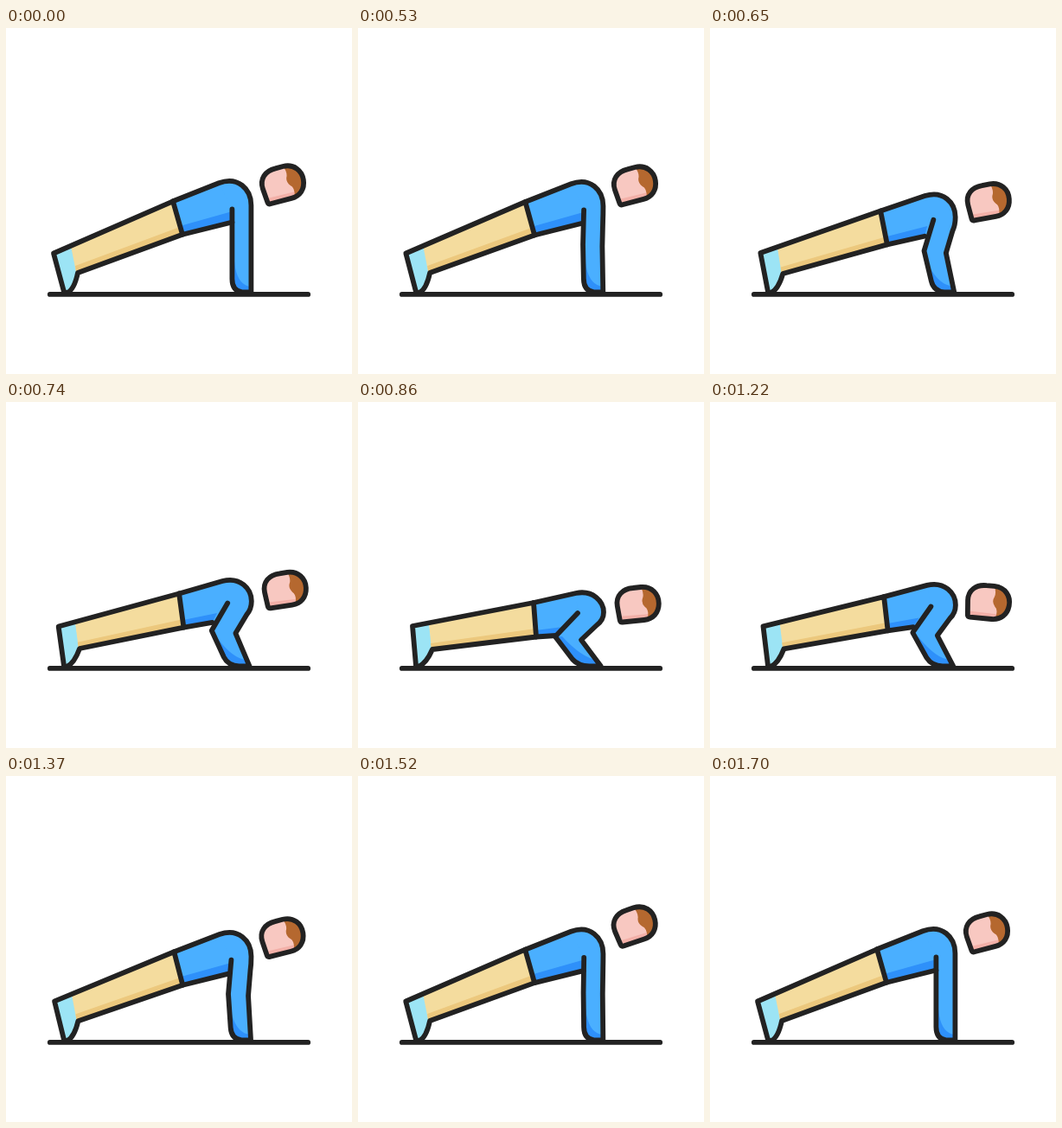
Recreate the animation shown at these times as an HTML page with a canvas. Size 400 by 400 pixels, loop 1.76 s.

```html
<!DOCTYPE html>
<html lang="en">
<head>
<meta charset="utf-8">
<title>Push-up</title>
<style>
html, body { margin: 0; width: 100%; height: 100%; overflow: hidden; background: #fff; }
canvas { display: block; }
</style>
</head>
<body>
<canvas id="stage" width="400" height="400"></canvas>
<script>
const ctx = document.getElementById('stage').getContext('2d');
const LOOP = 1760, STEP = 30, START = 530, END = 1700;

// Rows of [time, value...]; returns smooth values without overshoot.
function track(rows, t) {
  const last = rows.length - 1;
  if (t <= rows[0][0]) return rows[0].slice(1);
  if (t >= rows[last][0]) return rows[last].slice(1);
  const i = rows.findIndex(r => r[0] > t) - 1;
  const span = rows[i + 1][0] - rows[i][0], u = (t - rows[i][0]) / span;
  return rows[i].slice(1).map((_, c) => {
    const rate = n => (rows[n + 1][c + 1] - rows[n][c + 1]) / (rows[n + 1][0] - rows[n][0]);
    const slope = n => {
      if (n === 0 || n === last) return 0;
      const a = rate(n - 1), b = rate(n);
      return a * b <= 0 ? 0 : 2 * a * b / (a + b);
    };
    const from = rows[i][c + 1], to = rows[i + 1][c + 1];
    return from + (to - from) * u * u * (3 - 2 * u)
      + span * u * (1 - u) * ((1 - u) * slope(i) - u * slope(i + 1));
  });
}

// time, drop of the shoulders
const drop = [[500, 0], [530, 1], [650, 15.5], [860, 43.5], [1040, 50],
  [1220, 34], [1370, 4], [1480, .8], [1700, 0]];

// time, x, y, tilt in degrees
const headMove = [[500, 320.3, 180.2, -9], [530, 320.3, 181.2, -9], [650, 322, 200.5, -4.5],
  [860, 323.8, 234, 0], [1040, 324.3, 241, 5], [1220, 322, 232, 11], [1370, 319.8, 186, -8.5],
  [1490, 320, 172, -13], [1600, 320.2, 176, -11], [1700, 320.3, 180.2, -9]];

const INK = '#222', BLUE = '#4aafff', DEEP = '#2e90fa';

// Each part: fill colour (or null for an outline), raised pose, lowered pose
const body = [
  ['#9ce4f5', 'M55 260.5 L76 252 L82 283 Q79 302 71 306 L67 305Z',
              'M63 259 L82 256 L86 286 Q79 302 70 306 L67 305Z'],
  ['#f4dc9e', 'M75 252 L193 200.3 L204 238.7 L81 282Z', 'M82 256 L203 232 L206 271.5 L85 286Z'],
  ['#ecc87d', 'M80 275 L201 230 L204 238.7 L81 282Z', 'M84 279 L205 262 L206 271.5 L85 286Z'],
  [BLUE, 'M193 200.3 L204 238.7 L261.4 224.5 L275 205 L246 179.2Z',
         'M203 232 L206 271.5 L229 270 L275 245 L252 221Z'],
  [DEEP, 'M201 229 L261.4 212 L261.4 224.5 L204 238.7Z', 'M205 264 L237 260 L229 270 L206 271.5Z'],
  [BLUE, 'M261.4 209.5 L261.4 250 L261.4 290 Q261.4 304 273 305.3 L283.4 305.3 L283.4 252 L283.4 222 Q283.4 215 283.4 205 C283.4 186 268 171 246 179.2Z',
         'M254 244 L228 271.3 L248 297.5 Q255 305.5 268 305.3 L280.7 305.3 L258 275 L276 258 Q284 252 284 243 C284 231 272 217 252 221Z'],
  [DEEP, 'M261.4 250 L261.4 290 Q261.4 304 273 305.3 L283.4 305.3 L283.4 299 Q269 298 265 277Z',
         'M228 271.3 L248 297.5 Q255 305.5 268 305.3 L280.7 305.3 L276 298 Q259 296 236 271Z'],
  [null, 'M193 200.3 L55 260.5 L67 305 L71 306 Q79 302 83 283 L204 238.7 L193 200.3',
         'M203 232 L63 259 L67 305 L70 306 Q79 302 86 286 L206 271.5 L203 232'],
  [null, 'M204 238.7 L261.4 224.5', 'M206 271.5 L229 270'],
  [null, 'M261.4 209.5 L261.4 250 L261.4 290 Q261.4 304 273 305.3 L283.4 305.3 L283.4 252 L283.4 222 Q283.4 215 283.4 205 C283.4 186 268 171 246 179.2 L193 200.3',
         'M254 244 L228 271.3 L248 297.5 Q255 305.5 268 305.3 L280.7 305.3 L258 275 L276 258 Q284 252 284 243 C284 231 272 217 252 221 L203 232']
];

const skull = new Path2D('M-18 20.5 Q-20.5 21 -21 18.5 L-24 2 C-26 -10 -18 -18 -6 -19 L3 -20 C16 -21 24 -12 24 -1 C24 10 17 17 7 18Z');
const jaw = new Path2D('M-24 14 L14 11 L14 24 L-24 24Z');
const hair = new Path2D('M2 -22 Q7 -14 5.5 -8 Q3 -2 8 3 Q13 6 11 17 L28 17 L28 -22Z');

function mix(a, b, kx, ky) {
  const ends = b.match(/[\d.]+/g);
  let n = 0;
  return a.replace(/[\d.]+/g, v => {
    const k = n % 2 ? ky : kx;
    return +v + (ends[n++] - v) * k;
  });
}

function fill(path, color) {
  ctx.fillStyle = color;
  ctx.fill(path);
}

function drawHead(t) {
  const [x, y, tilt] = track(headMove, t);
  ctx.save();
  ctx.translate(x, y);
  ctx.rotate(tilt * Math.PI / 180);
  ctx.save();
  ctx.clip(skull);
  fill(skull, '#f8c8c1');
  fill(jaw, '#f3b0a8');
  fill(hair, '#b5682f');
  ctx.restore();
  ctx.stroke(skull);
  ctx.restore();
}

function draw(now) {
  const time = now % LOOP;
  const t = time < START ? 0 : Math.min(END, START + STEP * Math.floor((time - START) / STEP));
  const k = track(drop, t)[0] / 43.5;
  const bend = k ** .85; // the elbow moves out fastest at first

  ctx.fillStyle = '#fff';
  ctx.fillRect(0, 0, 400, 400);
  ctx.strokeStyle = INK;
  ctx.lineWidth = 5.8;
  ctx.lineCap = ctx.lineJoin = 'round';
  for (const [color, up, down] of body) {
    const path = new Path2D(mix(up, down, bend, k));
    if (color) fill(path, color);
    else ctx.stroke(path);
  }
  drawHead(t);
  ctx.stroke(new Path2D('M50.8 307.9 H349.2'));
  requestAnimationFrame(draw);
}
requestAnimationFrame(draw);
</script>
</body>
</html>
```
